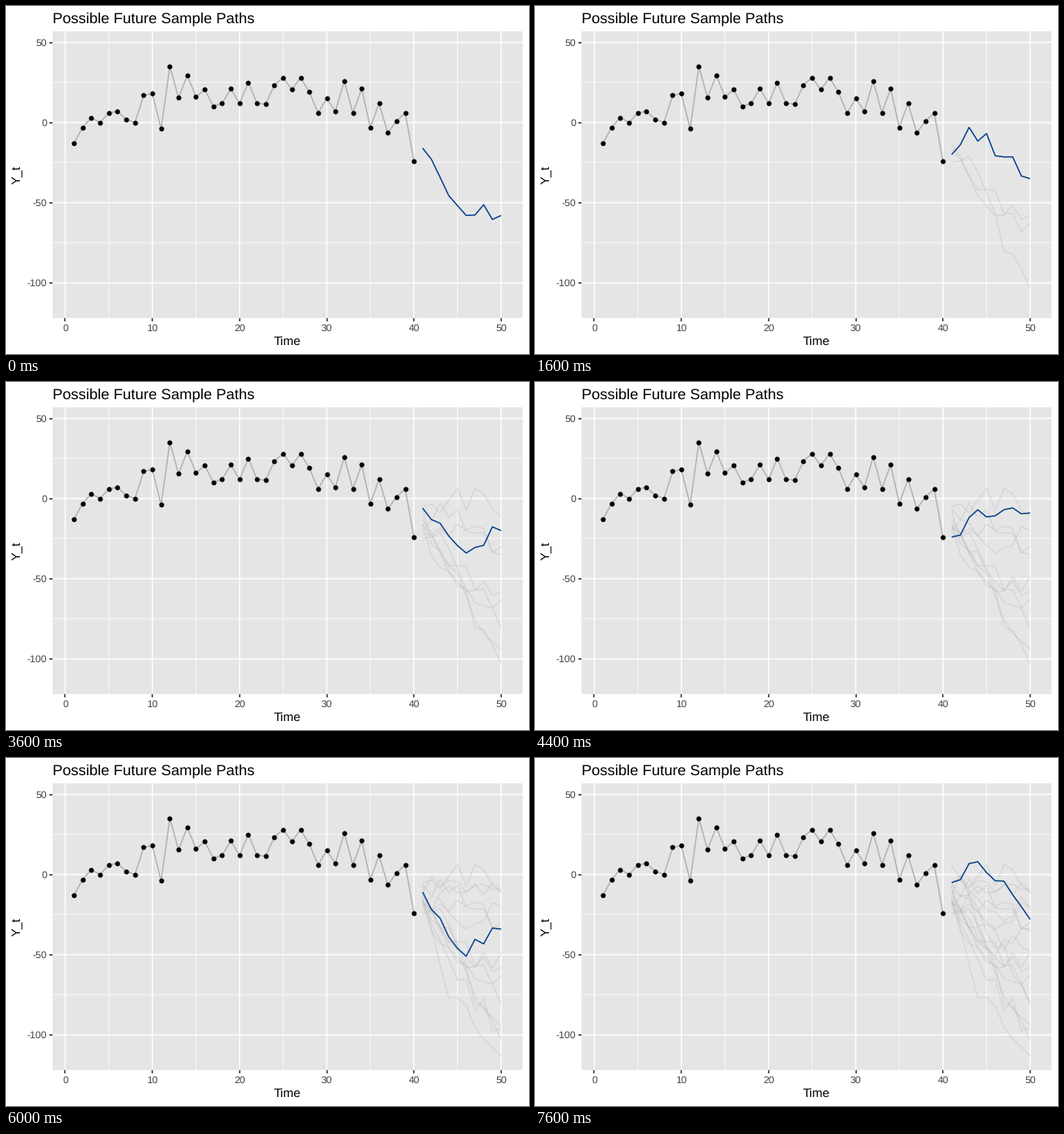
Write a matplotlib script that moves like this. It is 640 by 426 pixels and loops after 8000 ms.

```python
import numpy as np
import matplotlib.pyplot as plt
from matplotlib.animation import FuncAnimation

W, H, DPI = 640, 426, 64
LEFT, RIGHT, TOP, BOTTOM = 57, 632, 31, 382
FRAMES, INTERVAL = 20, 400

PANEL, INK, LABEL = "#e5e5e5", "#2b2b2b", "#444444"
HISTORY, ACTIVE = "#b0b0b0", "#003c8a"

plt.rcParams.update({"font.family": "Liberation Sans", "text.hinting": "none"})

observed = [-13, -3, 3, 0, 6, 7, 2, 0, 17, 18, -4, 35, 15.5, 29.5, 16, 20.5, 10, 12, 21, 12,
            25, 12, 11.5, 23.5, 28, 20.5, 28, 19, 6, 15, 7, 26, 6, 21, -3, 12, -6.5, 1, 6, -24]

# One simulated path each: start, step of the main turn, value there, end
turns = [
    (-16, 6, -58, -58), (-13, 3, -33, -63), (-25, 3, -21, -103), (-20, 3, -3, -35),
    (-5, 8, 3, -11), (-16, 3, -43, -81), (-22, 5, -16, -30), (-7, 7, -76, -94),
    (-6, 6, -34, -20), (-18, 6, -52, -49), (-24, 4, -7, -9), (-12, 2, -1, -11),
    (-15, 4, -53, -96), (-17, 4, -77, -113), (-11, 6, -51, -34), (6, 5, -22, -22),
    (-10, 6, -35, -48), (-6, 2, 0, -80), (-5, 4, 8, -28),
]

rng = np.random.default_rng(7)


def px(n):
    """Pixels to points."""
    return n * 72 / DPI


def simulate(start, step, value, end):
    """Run through the three key points, with noise at the other steps."""
    t = np.arange(1, 11)
    noise = np.where(np.isin(t, (1, step, 10)), 0, rng.normal(0, 5, t.size))
    path = np.interp(t, (1, step, 10), (start, value, end)) + noise
    return np.clip(path, -113, 8)


fig = plt.figure(figsize=(W / DPI, H / DPI), dpi=DPI, facecolor="white")
ax = fig.add_axes([LEFT / W, 1 - BOTTOM / H, (RIGHT - LEFT) / W, (BOTTOM - TOP) / H],
                  facecolor=PANEL)
ax.set_xlim(-1.45, 52.45)
ax.set_ylim(-122, 56.9)
ax.set_axisbelow(True)
for spine in ax.spines.values():
    spine.set_visible(False)

xticks, yticks = range(0, 51, 10), range(-100, 51, 50)
ax.set_xticks(xticks, [str(v) for v in xticks])
ax.set_yticks(yticks, [str(v) for v in yticks])
ax.set_xticks(range(5, 50, 10), minor=True)
ax.set_yticks(range(-75, 50, 50), minor=True)
ax.tick_params(length=px(3.8), width=px(1.5), color=INK, pad=px(3),
               labelsize=px(12.2), labelcolor=LABEL)
ax.tick_params(which="minor", length=0)
ax.grid(color="white", lw=px(1.5), snap=False)
ax.grid(which="minor", color="white", lw=px(0.75), snap=False)


def put_text(x, y, text, size, **kw):
    fig.text(x / W, 1 - y / H, text, fontsize=px(size), va="baseline", **kw)


put_text(57, 20, "Possible Future Sample Paths", 18.33)
put_text(344.5, 416, "Time", 15.28, ha="center")
put_text(18, 206.5, "Y_t", 15.28, ha="center", rotation=90, rotation_mode="anchor")

line_style = dict(lw=px(1.5), solid_capstyle="butt", solid_joinstyle="round")
time = np.arange(1, 41)
ax.plot(time, observed, color=HISTORY, zorder=3, **line_style)
ax.plot(time, observed, "o", color="black", ms=px(6.1), mew=0, zorder=4, snap=False)

future = np.arange(41, 51)
lines = [ax.plot(future, simulate(*turn), **line_style)[0] for turn in turns]


def draw(i):
    current = max(0, i - 1)  # the first path is held twice as long
    for k, line in enumerate(lines):
        active = k == current
        line.set_visible(k <= current)
        line.set_color(ACTIVE if active else HISTORY)
        line.set_alpha(1 if active else 0.28)
        line.set_zorder(6 if active else 5)
    return lines


anim = FuncAnimation(fig, draw, frames=FRAMES, interval=INTERVAL,
                     init_func=lambda: draw(0), repeat=True, repeat_delay=0)
plt.show()
```
